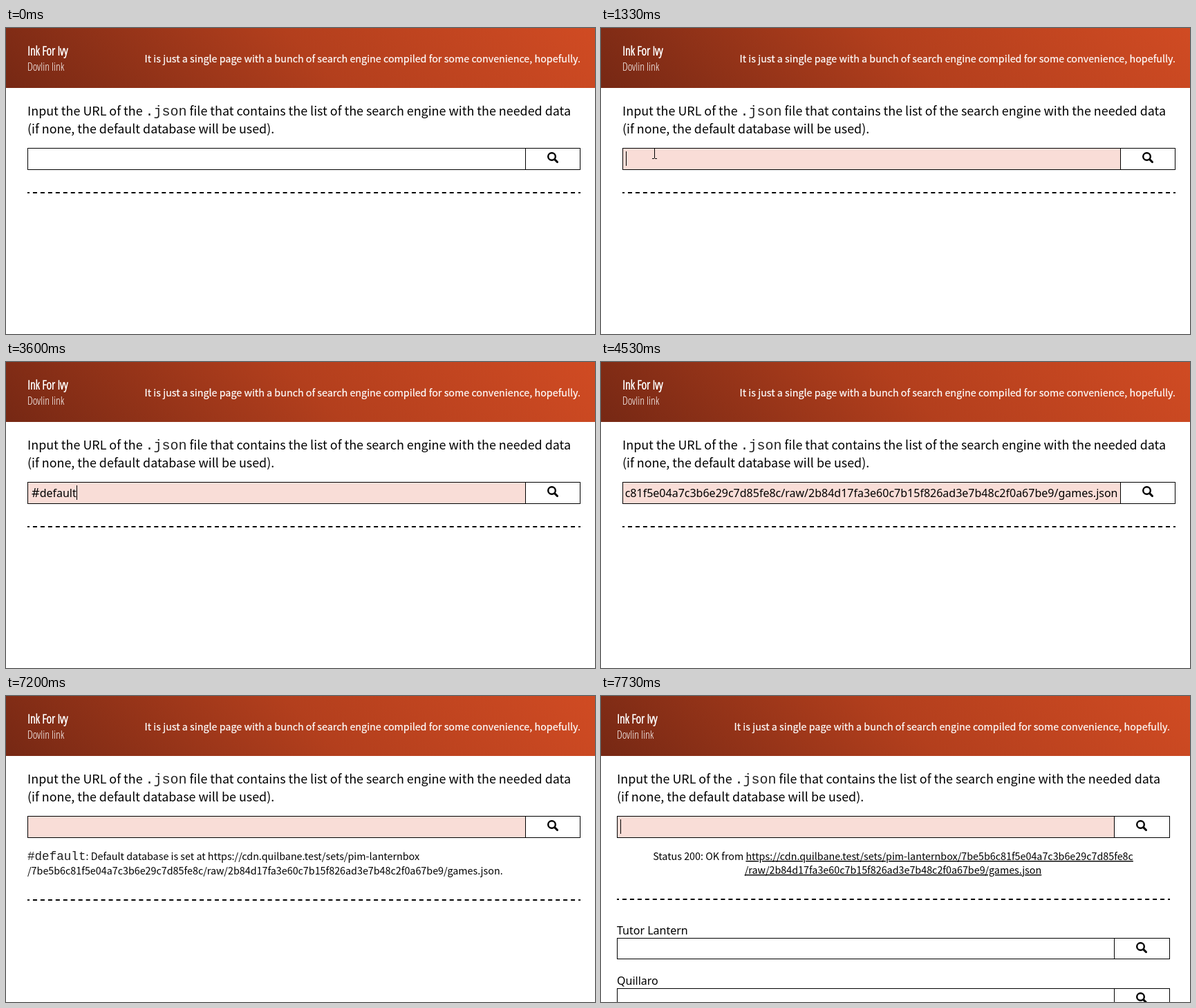
These frames come from a looping animation (852 px wide and 444 px high, 8000 ms). An HTML page:

```html
<!DOCTYPE html>
<html lang="en">
<head>
<meta charset="utf-8">
<title>Search page</title>
<style>
html, body { margin: 0; width: 100%; height: 100%; overflow: hidden; background: #fff; }
header { position: absolute; width: 852px; height: 87px;
  background: linear-gradient(45deg, #762814, #b33f1d 52%, #d04b23); }
svg { position: absolute; width: 852px; height: 444px; }
text { font: 14.32px 'Noto Sans CJK JP', 'Noto Sans CJK SC', sans-serif; white-space: pre; }
.lead { font-size: 17.9px; }
.head { fill: #fff; stroke: #fff; stroke-width: .2px; }
.name, .sub { font-family: 'Open Sans Condensed Light', 'Open Sans Condensed', 'Open Sans', sans-serif;
  font-stretch: 75%; fill: #fff; }
.name { font-size: 18px; font-weight: 700; }
.sub { font-size: 16px; font-weight: 300; }
.field { font: 16px 'Noto Sans', 'Open Sans', sans-serif; }
.mono { font-family: 'Liberation Mono', monospace; fill: #222; }
.link { text-decoration: underline; }
</style>
</head>
<body>
<header></header>
<svg id="stage" viewBox="0 0 852 444"></svg>
<script>
const LOOP = 8000;
const stage = document.getElementById('stage');
const host = 'https://cdn.quilbane.test/sets/pim-lanternbox';
const id = '/7be5b6c81f5e04a7c3b6e29c7d85fe8c';
const tail = '/raw/2b84d17fa3e60c7b15f826ad3e7b48c2f0a67be9/games.json';

// Steps over time: [start, value...]
const typing = [[0, ''], [2730, '#'], [2930, '#d'], [3070, '#de'], [3330, '#def'], [3470, '#defa'],
  [3530, '#defau'], [3600, '#default'], [3870, '#default '], [4530, 'url'], [4670, '']];
const caret = [[0, 0], [1330, 1], [1870, 0], [2400, 1], [4400, 0], [4670, 1], [5070, 0],
  [5600, 1], [6070, 0], [6670, 1], [7200, 0], [7730, 1]];
const mouse = [[0], [800, 'beam', 43, 185], [870, 'beam', 61, 181], [930, 'beam', 75, 179],
  [1070, 'beam', 76, 180], [1130, 'beam', 77, 182], [1470, 'arrow', 17, 197], [1530]];
const phase = [[0, 'idle'], [4670, 'set'], [7600, 'fetch'], [7670, 'done']];
const at = (steps, t) => steps.findLast(s => s[0] <= t);

const text = (x, y, cls, body, anchor = 'start') =>
  `<text x="${x}" y="${y}" class="${cls}" text-anchor="${anchor}">${body}</text>`;
const link = s => `<tspan class="link">${s}</tspan>`;
const mono = (s, size) => `<tspan class="mono" style="font-size:${size}px">${s}</tspan>`;

function searchBox(x, y, h, split, fill) {
  const cx = split + 38, cy = y + 12.5;
  return `<rect x="${x + .5}" y="${y + .5}" width="799" height="${h - 1}" fill="#fff" stroke="#000"/>
    <rect x="${x + 1}" y="${y + 1}" width="${split - x - 1}" height="${h - 2}" fill="${fill}"/>
    <path d="M${split + .5} ${y}v${h}" stroke="#000"/>
    <g fill="none" stroke="#000"><circle cx="${cx + .5}" cy="${cy}" r="5.3" stroke-width="2.4"/>
    <path d="M${cx + 4.6} ${cy + 4.1}l3.9 3.9" stroke-width="3" stroke-linecap="round"/></g>`;
}

const pointers = {
  beam: '<path d="M-3.5-7.5h3M.5-7.5h3M0-7v14M-3.5 7.5h3M.5 7.5h3" stroke="#000" fill="none"/>',
  arrow: '<path d="M.5.5v16l3.7-3.5 2.5 5.5 2.5-1.1-2.5-5.4h5z" fill="#fff" stroke="#000"/>'
};

function message(state, x, mid) {
  if (state == 'idle') return '';
  if (state == 'set') return text(x, 238, '', `${mono('#default', 17.6)}: Default database is set at ${host}`) +
    text(x, 259, '', id + tail + '.');
  const lead = state == 'fetch' ? 'Retrieving JSON database from ' : 'Status 200: OK from ';
  return text(mid, 238, '', lead + link(host + id), 'middle') +
    text(mid, 258, '', link(tail) + (state == 'fetch' ? '.' : ''), 'middle');
}

// Evenly spaced dashes with a half dash at both ends
const rule = (x, y) => `<path d="M${x} ${y}h800" stroke="#000" stroke-width="2"
  stroke-dasharray="6 ${800 / 73 - 6}" stroke-dashoffset="3"/>`;

function scene(t) {
  const state = at(phase, t)[1], done = state == 'done';
  const x = done ? 23 : 31, split = done ? 742 : 751;
  const typed = at(typing, t)[1], [, pointer, px, py] = at(mouse, t);
  const ruleY = { idle: 239, set: 296, fetch: 295, done: 295 }[state];

  let out = text(x, 40, 'name', 'Ink For Ivy') + text(x, 62, 'sub', 'Dovlin link') +
    text(x + 800, 50, 'head', 'It is just a single page with a bunch of search engine compiled for some convenience, hopefully.', 'end') +
    text(x, 127, 'lead', `Input the URL of the ${mono('.json', 20)} file that contains the list of the search engine with the needed data`) +
    text(x, 153, 'lead', '(if none, the default database will be used).') +
    searchBox(x, 174, 32, split, t < 1330 ? '#fff' : '#f9ddd7');

  if (typed == 'url') {
    out += '<clipPath id="clip"><rect x="35" y="175" width="713" height="30"/></clipPath>' +
      `<g clip-path="url(#clip)">${text(747.5, 196, 'field', host + id + tail, 'end')}</g>`;
  } else if (typed) {
    out += text(37, 196, 'field typed', `<tspan style="font-size:18px">#</tspan>${typed.slice(1)}`);
  }
  if (at(caret, t)[1]) out += `<rect class="caret" x="${x + 5}" y="179" width="1" height="21"/>`;
  out += message(state, x, x + (done ? 399.5 : 400)) + rule(x, ruleY);
  if (done) ['Tutor Lantern', 'Quillaro'].forEach((label, i) => {
    out += text(x, 346 + 73 * i, 'field', label) + searchBox(x, 351 + 73 * i, 31, split, '#fff');
  });
  if (pointer) out += `<g transform="translate(${pointer == 'beam' ? px + .5 : px} ${py})">${pointers[pointer]}</g>`;
  return out;
}

let shown = '';
function frame(now) {
  const next = scene(now % LOOP);
  if (next != shown) {
    stage.innerHTML = shown = next;
    const typed = stage.querySelector('.typed'), bar = stage.querySelector('.caret');
    if (typed && bar) bar.setAttribute('x', Math.round(37 + typed.getComputedTextLength()));
  }
  requestAnimationFrame(frame);
}
frame(0);
</script>
</body>
</html>
```
